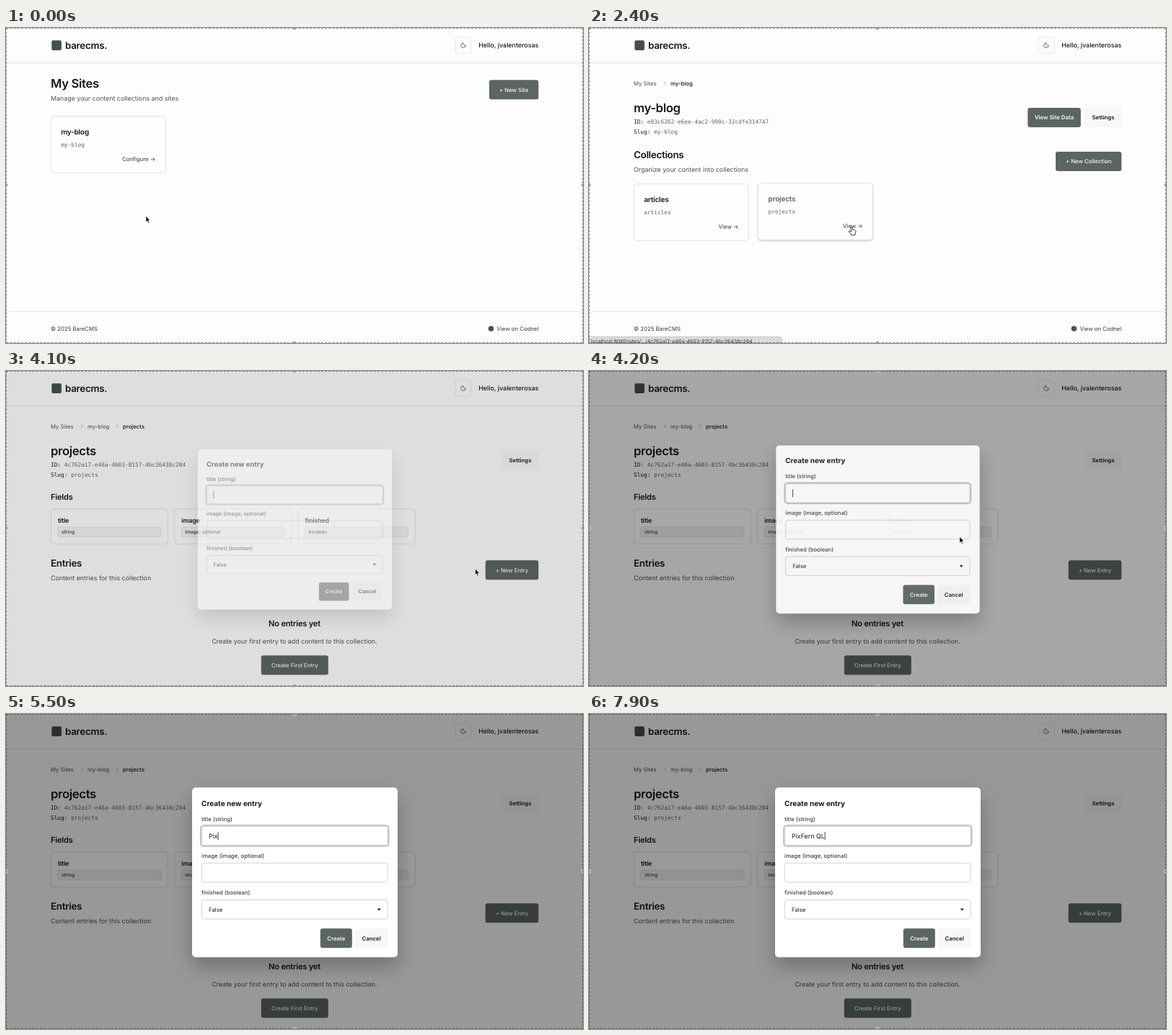
An HTML page for the animation above (8 s loop, 800 px wide and 438 px high).

```html
<!DOCTYPE html>
<html lang="en">
<head>
<meta charset="utf-8">
<title>Site manager</title>
<style>
  html, body { margin: 0; height: 100%; overflow: hidden; background: #fdfdfd; }
  svg { display: block; width: 100%; height: 100%; }
  text { font-family: Inter, sans-serif; white-space: pre; text-rendering: geometricPrecision; }
  .head { letter-spacing: -.02em; }
  .mono { font-family: "DejaVu Sans Mono", monospace; }
  .card > rect:first-child { filter: drop-shadow(0 .6px .7px rgba(0, 0, 0, .16)); }
  .card.hover { transform: translateY(-1px); }
  .card.hover > rect:first-child { filter: drop-shadow(0 1.2px 1.5px rgba(0, 0, 0, .22)); }
  .card.hover .head { fill: #5c6660; }
  #panel { filter: drop-shadow(0 13px 13px rgba(0, 0, 0, .25)); }
</style>
</head>
<body>
<svg id="stage" viewBox="0 0 800 438"></svg>
<script>
const LOOP = 8000;
const SMALL = 7.78, BODY = 8.89;
const INK = '#15191a', SOFT = '#4b5150', GREEN = '#5c6660', LINE = '#e2e3e3';

// y is the middle of the capitals
const text = (str, x, y, size = SMALL, weight = 400, fill = INK, more = '') =>
  `<text x="${x}" y="${y + size * .36}" font-size="${size}" font-weight="${weight}" fill="${fill}" ${more}>${str}</text>`;
const heading = (str, x, y, size, more = '') => text(str, x, y, size, 600, INK, `class="head" ${more}`);
const mono = (str, x, y, fill = '#5e6463', weight = 400) => text(str, x, y, SMALL, weight, fill, 'class="mono"');
const box = (x, y, w, h, fill, stroke = 'none', r = 3, more = '') =>
  `<rect x="${x}" y="${y}" width="${w}" height="${h}" rx="${r}" fill="${fill}" stroke="${stroke}" stroke-width=".8" ${more}/>`;
const middle = 'text-anchor="middle"', end = 'text-anchor="end"';

const button = (label, x, y, w, weight = 500) =>
  box(x, y, w, 27, GREEN) + text(label, x + w / 2, y + 13.5, SMALL, weight, '#f6f8f6', middle);
const plainButton = (label, x, y, w) =>
  box(x, y, w, 27, '#f7f7f7') + text(label, x + w / 2, y + 13.5, SMALL, 600, INK, middle);

const card = (id, name, link, x, y) => `<g class="card" id="${id}">
  ${box(x, y, 158.5, 78.5, '#fefefe', LINE, 4)}
  ${heading(name, x + 13.8, y + 21, 10)}
  ${mono(name, x + 13.8, y + 39)}
  ${text(link + ' →', x + 145, y + 59, SMALL, 500, SOFT, end)}</g>`;

const field = (name, type, x) => `<g class="card">
  ${box(x, 192, 162, 48.5, '#fefefe', LINE, 4)}
  ${heading(name, x + 9.5, 208, BODY)}
  ${box(x + 9.5, 217, 143, 13.8, '#f2f2f2', '#dcdede', 2)}
  ${text(type, x + 14.5, 224, 6.67, 500, '#333938')}</g>`;

const crumbs = (...items) => items.map(([label, x], i) => {
  const last = i === items.length - 1;
  return text(label, x, 77, SMALL, last ? 500 : 400, last ? INK : SOFT) +
    (last ? '' : `<path d="M${items[i + 1][1] - 9} 74.5l2.4 2.5-2.4 2.5" fill="none" stroke="#999" stroke-width=".7"/>`);
}).join('');

const titleBlock = (name, id) => heading(name, 62, 111, 16.67) +
  mono('ID:', 62, 130.5, INK, 500) + mono(id, 80.8, 130.5) +
  mono('Slug:', 62, 144, INK, 500) + mono(name, 90.2, 144);

const header = box(63.3, 17.3, 13.6, 13.6, '#44504a', 'none', 2) +
  heading('barecms.', 82, 24, 13.33) +
  box(623, 13, 22, 22, '#fdfdfd', LINE) +
  `<path d="M634 20.6a2.6 2.6 0 0 0 3.4 3.4 3.4 3.4 0 1 1-3.4-3.4z" fill="none" stroke="${SOFT}" stroke-width=".8"/>` +
  text('Hello, jvalenterosas', 738.3, 24, BODY, 500, INK, end) +
  `<path d="M0 48.5H800" stroke="${LINE}"/>`;

const footer = `<path d="M0 394.5H800" stroke="${LINE}"/>` +
  text('© 2025 BareCMS', 62, 418, SMALL, 400, '#333938') +
  `<circle cx="672.5" cy="418" r="3.8" fill="${SOFT}"/>` +
  text('View on Codnel', 738.3, 418, SMALL, 400, '#333938', end);

const SITE_ID = 'e83c6262-e6ee-4ac2-990c-32cdfe314747';
const COLLECTION_ID = '4c762a17-e46a-4603-8157-4bc36438c284';

const pages = [
  heading('My Sites', 62, 77, 16.67) +
  text('Manage your content collections and sites', 62, 98, BODY, 400, SOFT) +
  button('+ New Site', 670, 72.3, 68.3) +
  card('site', 'my-blog', 'Configure', 62.4, 123) + footer,

  crumbs(['My Sites', 62], ['my-blog', 113]) + titleBlock('my-blog', SITE_ID) +
  button('View Site Data', 608.3, 111, 73.5, 600) + plainButton('Settings', 687.5, 111, 51) +
  heading('Collections', 62, 176, 13.33) +
  text('Organize your content into collections', 62, 196.5, BODY, 400, SOFT) +
  button('+ New Collection', 647, 172, 91.3) +
  card('articles', 'articles', 'View', 62.4, 217) +
  card('projects', 'projects', 'View', 234.8, 217) + footer,

  crumbs(['My Sites', 62], ['my-blog', 113], ['projects', 162]) + titleBlock('projects', COLLECTION_ID) +
  plainButton('Settings', 687.5, 111, 51) +
  heading('Fields', 62, 175, 11.11) +
  field('title', 'string', 62.4) + field('image', 'image, optional', 233.8) + field('finished', 'boolean', 405) +
  heading('Entries', 62, 267, 13.33) +
  text('Content entries for this collection', 62, 287.5, BODY, 400, SOFT) +
  button('+ New Entry', 664.7, 263.3, 73.6) +
  heading('No entries yet', 400, 351.5, 11.11, middle) +
  text('Create your first entry to add content to this collection.', 400, 375.5, BODY, 400, SOFT, middle) +
  button('Create First Entry', 353.8, 395.5, 93)
];

const label = (str, y) => text(str, 271, y, SMALL, 500, '#3a403f');
const modal = box(258, 102.3, 285, 236, '#fff', 'none', 5, 'id="panel"') +
  text('Create new entry', 271, 124, 10, 700) +
  label('title (string)', 146) + label('image (image, optional)', 197) + label('finished (boolean)', 248) +
  box(269.8, 154.7, 261, 29.4, '#fff', '#7d8382', 4) +
  box(271.4, 156.3, 257.8, 26.2, '#fff', '#b4b8b7') +
  box(271.4, 207.3, 257.8, 26.5, '#fff', '#c6c9c8') +
  box(271.4, 258.5, 257.8, 26.5, '#fff', '#c6c9c8') +
  text('', 281, 169.5, BODY, 400, INK, 'id="typed"') +
  `<path id="caret" d="M.4 164v11" stroke="${INK}" stroke-width=".8"/>` +
  text('False', 281, 271.7) + `<path d="M514.8 270.6h5l-2.5 2.8z" fill="${INK}"/>` +
  button('Create', 435.8, 298.3, 44, 600) + plainButton('Cancel', 484, 298.3, 45.3);

const stage = document.getElementById('stage');
stage.innerHTML = box(0, 0, 800, 438, '#fdfdfd', 'none', 0) + header +
  pages.map((p, i) => `<g id="page${i}">${p}</g>`).join('') +
  `<g id="status">${box(-3, 429.3, 270, 14, '#d9dada', '#bfc1c1')}${text('', 2.5, 435.8, 7, 400, '#3c4241', 'id="url"')}</g>` +
  box(0, 0, 800, 438, '#000', 'none', 0, 'id="shade"') + `<g id="modal">${modal}</g>
  <path d="M0 .4H800M0 437.6H800M.4 0V438M799.6 0V438" stroke="#000" stroke-opacity=".55" stroke-width=".9" stroke-dasharray="3.2 2"/>
  <g fill="#8a8a8a" stroke="#e4e4e4" stroke-width=".8">${
    [[400, 0], [400, 438], [0, 218.5], [800, 218.5]].map(([x, y]) => `<circle cx="${x}" cy="${y}" r="2.4"/>`).join('')}</g>
  <g id="cursor" stroke-linejoin="round">
    <path id="arrow" d="M0 0V8.4L1.9 6.7 3.2 9.8 4.6 9.2 3.3 6.2H5.9Z" fill="#000" stroke="#fff" stroke-width=".6"/>
    <path id="hand" d="M-1 .3Q0-1 1 .3L1.6 3.4Q2.6 2.7 3.2 3.7 4.2 3 4.7 4.2 5.8 3.9 5.9 5.2L5.5 8.6 4.7 11H-.2L-1.2 8.8-3.6 6.3Q-3.8 4.8-2.2 5.2L-.5 6.4Z" fill="#fff" stroke="#000" stroke-width=".8"/>
  </g>`;

const el = id => document.getElementById(id);
const show = (id, on) => el(id).setAttribute('display', on ? 'inline' : 'none');
const clamp = v => Math.min(1, Math.max(0, v));
const ease = u => u * u * u * (u * (6 * u - 15) + 10);

// [start, end, x, y]: the pointer travels to x, y between start and end
const moves = [[300, 800, 190, 183], [1550, 2250, 364, 277], [2850, 3400, 687, 287], [4000, 4400, 344, 175]];
function pointer(t) {
  let x = 194, y = 261.5;
  for (const [from, to, tx, ty] of moves) {
    const p = ease(clamp((t - from) / (to - from)));
    x += (tx - x) * p;
    y += (ty - y) * p;
  }
  return [x, y];
}

const TITLE = 'PixFern QL';
const keys = [4900, 5150, 5350, 5700, 5900, 6150, 6400, 7100, 7400, 7700];
const OPEN = 4000;

function draw(t) {
  const page = t < 1400 ? 0 : t < 2800 ? 1 : 2;
  pages.forEach((_, i) => show('page' + i, i === page));

  const [x, y] = pointer(t);
  const over = (x0, y0, w, h) => x > x0 && x < x0 + w && y > y0 && y < y0 + h;
  const hovers = {
    site: page === 0 && over(62, 123, 159, 79),
    articles: page === 1 && over(62, 217, 159, 79),
    projects: page === 1 && over(235, 217, 159, 79)
  };
  for (const id in hovers) el(id).classList.toggle('hover', hovers[id]);
  const onLink = Object.values(hovers).some(Boolean) || (page === 2 && t < OPEN && over(664, 263, 74, 27));
  el('cursor').setAttribute('transform', `translate(${x} ${y})`);
  show('cursor', t < keys[0]);
  show('arrow', !onLink);
  show('hand', onLink);

  show('status', (hovers.site && t >= 1000) || hovers.projects);
  el('url').textContent = 'localhost:8080/sites/' + (page ? '.../' + COLLECTION_ID : SITE_ID);

  const p = clamp((t - OPEN) / 222);
  const scale = .9 + .1 * p;
  el('shade').setAttribute('opacity', .4 * p ** 1.5);
  el('modal').setAttribute('opacity', p);
  el('modal').setAttribute('transform', `translate(400 220) scale(${scale}) translate(-400 -220)`);

  const count = keys.filter(k => k <= t).length;
  const typed = el('typed');
  typed.textContent = TITLE.slice(0, count);
  el('caret').setAttribute('transform', `translate(${281 + (count ? typed.getComputedTextLength() : 0)} 0)`);
  show('caret', (t - (count ? keys[count - 1] : OPEN)) % 1000 < 500);
}

function tick() {
  draw(performance.now() % LOOP);
  requestAnimationFrame(tick);
}
tick();
</script>
</body>
</html>
```
